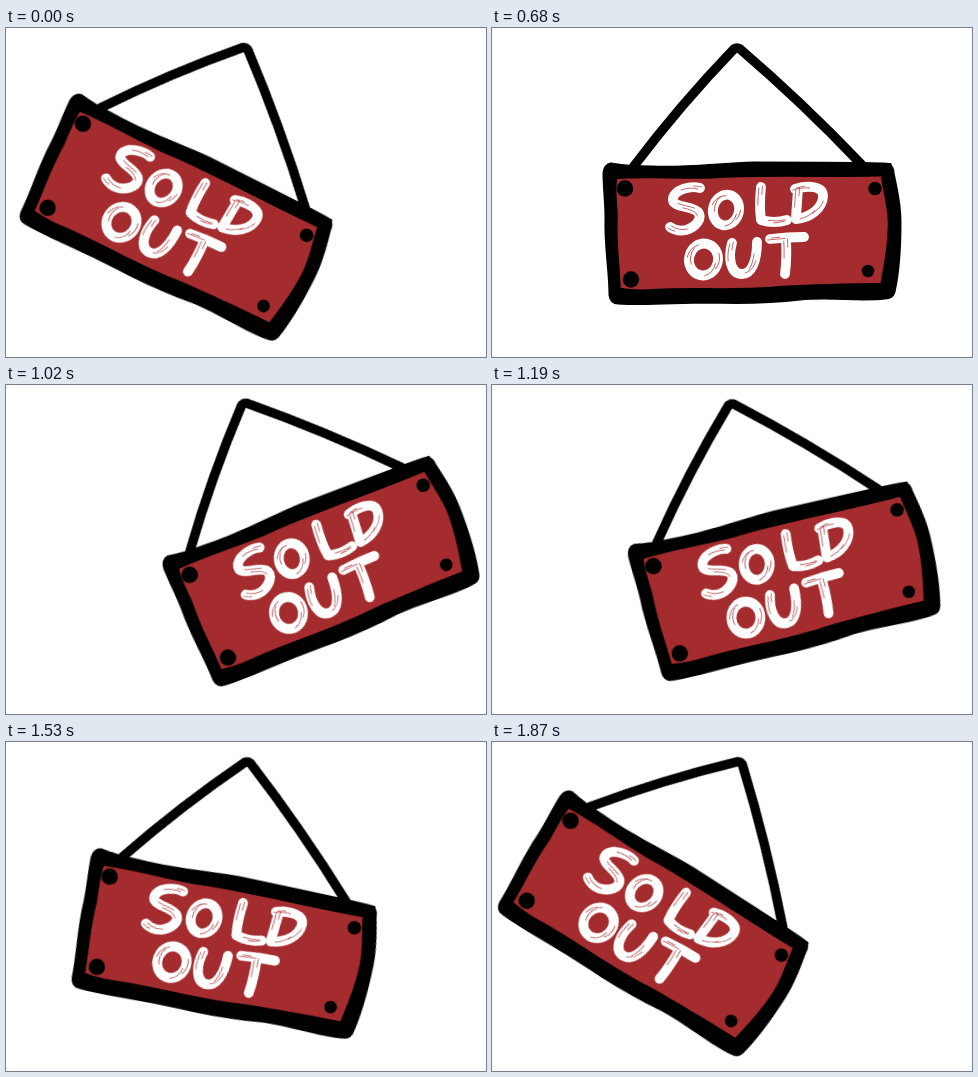
An HTML page for the animation above (2040 ms loop, 480 by 329 pixels).

```html
<!DOCTYPE html>
<html lang="en">
<head>
<meta charset="utf-8">
<title>Sold out</title>
<style>
  html, body { margin: 0; width: 100%; height: 100%; overflow: hidden; background: #fff; }
  svg { display: block; width: 100%; height: 100%; }

  /* The sign hangs rigidly from its peak; 12 held poses per loop, 170 ms each. */
  #swing { animation: swing 2040ms infinite; transform-origin: 0 0; }
  @keyframes swing {
    0%       { transform: translate(239.8px, 20px) rotate(26.5deg); animation-timing-function: steps(2); }
    16.6666% { transform: translate(242.3px, 20px) rotate(14.3deg); animation-timing-function: steps(2); }
    33.3333% { transform: translate(245px, 20px) rotate(0deg); animation-timing-function: steps(2); }
    50%      { transform: translate(238px, 18.5px) rotate(-21deg); animation-timing-function: steps(1); }
    58.3333% { transform: translate(239px, 19px) rotate(-13deg); animation-timing-function: steps(1); }
    66.6666% { transform: translate(240px, 19.5px) rotate(-1.4deg); animation-timing-function: steps(1); }
    75%      { transform: translate(242px, 20px) rotate(11.8deg); animation-timing-function: steps(2); }
    91.6666% { transform: translate(248.5px, 20.5px) rotate(32.5deg); animation-timing-function: steps(1); }
    100%     { transform: translate(239.8px, 20px) rotate(26.5deg); }
  }

  .line { fill: none; stroke-linecap: round; stroke-linejoin: round; }
  .rope { stroke: #000; stroke-width: 9.5; }
  .frame { stroke: #000; stroke-width: 3; }
  .board { fill: #a52c2e; stroke: #000; stroke-width: 2.5; }
  .ink { stroke: #fff; stroke-width: 9.8; }
  .streaks { stroke: #a52c2e; stroke-width: .7; stroke-dasharray: 17 31; }
</style>
</head>
<body>
<svg viewBox="0 0 480 329" role="img" aria-label="SOLD OUT">
  <defs>
    <g id="word">
      <path d="M208 160 C198 157 183 162 181 170 C179 180 198 177 206 184 C211 190 204 199 194 202 Q185 204 178 199"/>
      <ellipse cx="234" cy="182" rx="13" ry="15.500" transform="rotate(14 234 182)"/>
      <path d="M269 159 Q267 178 269 192 Q282 196 295 192"/>
      <path d="M306 161 L304 189 M303 161 C316 157 331 158 331 168 C331 180 318 190 304 191"/>
      <ellipse cx="211.500" cy="231.500" rx="14.500" ry="16" transform="rotate(12 211.500 231.500)"/>
      <path d="M240 215 C236 229 238 246 250 246 C260 246 265 232 265 214"/>
      <path d="M278 211 Q296 209 312 209 M294 212 Q295 230 293 246"/>
    </g>
  </defs>
  <g id="swing">
    <g transform="translate(-245 -20)">
      <path class="line rope" d="M142 138 Q189 76 242 21 Q245 19 248 21 Q311 75 369 136"/>
      <path class="frame" d="M119 136 Q134 139 160 139 C192 141 225 136 262 135 Q340 135 372 135.500 T397 137 Q401 139 401 145 C404 160 408 174 408 194 C408 222 406 246 402 264 Q400 270 393 270 C365 273 340 268 308 271 C276 275 250 275 216 274 C185 274 155 277 126 275 Q119 275 118 267 C118 242 113 218 114 190 C114 174 112 160 112 145 Q113 137 119 136Z"/>
      <path class="board" d="M124 150 C160 147 192 151 225 149 C280 146 340 149 390 147 C392 164 397 178 397 196 C397 220 393 238 389.500 256 C350 257 316 257 280 260 C240 263 200 260 165 262 Q145 264 127.500 261 C127 238 123 215 124.500 188 C124 174 122 162 124 150Z"/>
      <circle cx="133" cy="160.500" r="8.300"/>
      <circle cx="383" cy="160.500" r="6.800"/>
      <circle cx="376" cy="243" r="6.300"/>
      <circle cx="139" cy="251.500" r="8.200"/>
      <use class="line ink" href="#word"/>
      <use class="line streaks" href="#word" x="-2.200" y="1"/>
      <use class="line streaks" href="#word" x="1.500" y="-1" stroke-dashoffset="9"/>
    </g>
  </g>
</svg>
</body>
</html>
```
